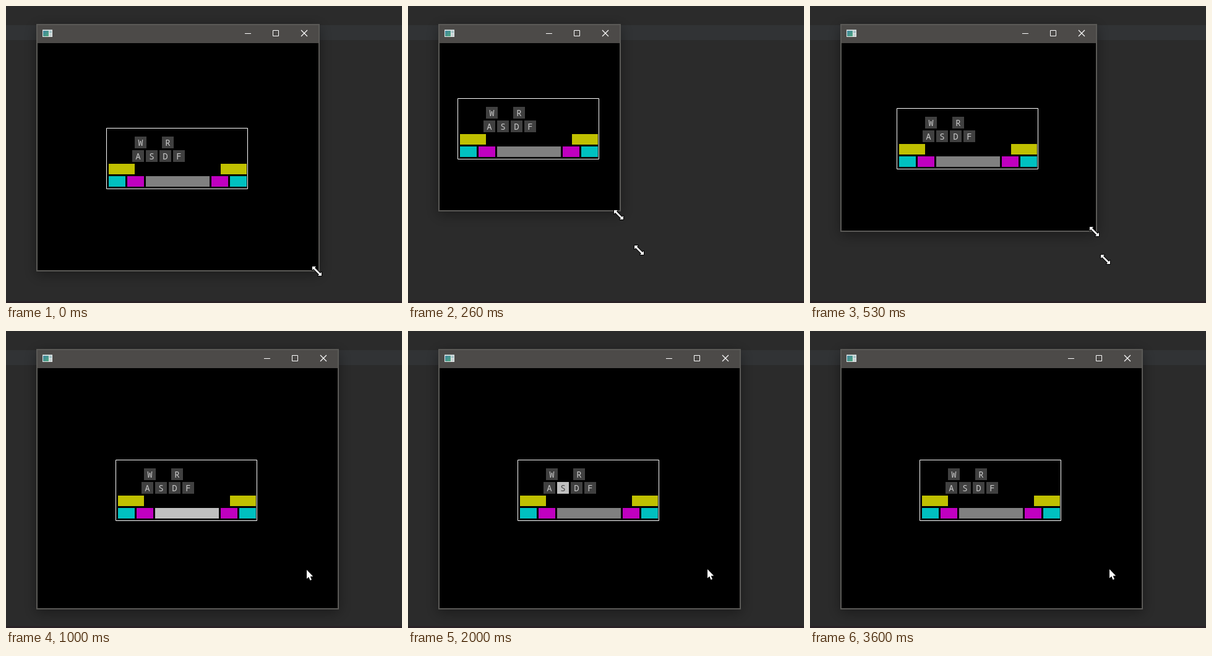
Animation, 640 px wide and 480 px high, one loop 3660 ms. Source, as an HTML page with a canvas:

```html
<!DOCTYPE html>
<html lang="en">
<head>
<meta charset="utf-8">
<title>Keyboard overlay</title>
<style>
html, body { margin: 0; width: 100%; height: 100%; overflow: hidden; background: #2b2b2b; }
canvas { display: block; width: 640px; height: 480px; }
</style>
</head>
<body>
<canvas id="stage" width="640" height="480"></canvas>
<script>
const ctx = document.getElementById('stage').getContext('2d');
const LOOP = 3660;

// start time, window right, window bottom, cursor x, cursor y
const sizes = [
  [0, 506, 428, 503, 429],
  [130, 447, 417, 445, 419],
  [200, 376, 389, 374, 395],
  [260, 343, 331, 341, 338],
  [330, 470, 378, 468, 381],
  [400, 590, 426, 587, 428],
  [460, 483, 407, 478, 410],
  [530, 463, 364, 460, 365],
  [600, 537, 449, 535, 450]
];

// start time, tip x, tip y
const pointer = [[660, 511, 417], [730, 486, 386], [1060, 485, 385], [1460, 484, 385]];

// key, pressed at, released at
const presses = [
  ['space', 1000, 1130], ['alt', 1200, 1330], ['ctrl', 1400, 1530], ['shift', 1600, 1660],
  ['S', 2000, 2130], ['A', 2200, 2260], ['D', 2400, 2460],
  ['F', 2800, 2930], ['R', 3000, 3130], ['F', 3200, 3260],
  ['W', 3530, 3600]
];

const letters = { W: [46, 14], R: [90, 14], A: [42, 36], S: [64, 36], D: [86, 36], F: [108, 36] };

// key, x, y, width, idle colour, pressed colour
const bars = [
  ['shift', 4, 58, 42, '#c0c000', '#ffff00'],
  ['shift', 185, 58, 42, '#c0c000', '#ffff00'],
  ['ctrl', 4, 78, 27, '#00c0c0', '#00ffff'],
  ['alt', 34, 78, 27, '#c000c0', '#ff00ff'],
  ['space', 64, 78, 103, '#808080', '#c0c0c0'],
  ['alt', 170, 78, 27, '#c000c0', '#ff00ff'],
  ['ctrl', 200, 78, 27, '#00c0c0', '#00ffff']
];

const resizeShape = [[-8, -8], [-2, -8], [-4, -6], [5, 3], [7, 1], [7, 7], [1, 7], [3, 5], [-6, -4], [-8, -2]];
const arrowShape = [[0, 0], [0, 14.5], [3.2, 11.6], [5.6, 17], [8, 16], [5.7, 10.7], [10.2, 10.5]];

function rect(x, y, w, h, color) {
  ctx.fillStyle = color;
  ctx.fillRect(x, y, w, h);
}

function current(steps, t) {
  let i = steps.length - 1;
  while (i > 0 && steps[i][0] > t) i--;
  return i;
}

function shape(points, x, y) {
  ctx.beginPath();
  points.forEach(([px, py]) => ctx.lineTo(x + px, y + py));
  ctx.closePath();
  ctx.lineWidth = 2;
  ctx.lineJoin = 'round';
  ctx.strokeStyle = '#000';
  ctx.stroke();
  ctx.fillStyle = '#fff';
  ctx.fill();
}

function drawIcon() {
  rect(59, 38, 16, 12, '#e4e8e8');
  rect(59, 38, 16, 1, '#a9b6b8');
  const g = ctx.createLinearGradient(60, 40, 69, 49);
  g.addColorStop(0, '#3f83a0');
  g.addColorStop(1, '#4fa77c');
  rect(60, 40, 9, 9, g);
  rect(70, 40, 4, 4, '#a9c4c8');
  rect(70, 45, 4, 4, '#c6d2d2');
}

function drawWindow(right, bottom) {
  ctx.save();
  ctx.shadowColor = 'rgba(0,0,0,0.38)';
  ctx.shadowBlur = 20;
  ctx.shadowOffsetY = 5;
  rect(49, 29, right - 48, bottom - 28, '#5a5956');
  ctx.restore();
  rect(51, 31, right - 52, 29, '#4c4a48');
  rect(51, 60, right - 52, bottom - 61, '#000');
  drawIcon();

  rect(right - 120, 44, 10, 1, '#fff');
  ctx.strokeStyle = '#fff';
  ctx.lineWidth = 1;
  ctx.strokeRect(right - 74.5, 39.5, 9, 9);
  const x = right - 29;
  ctx.lineWidth = 1.15;
  ctx.beginPath();
  ctx.moveTo(x, 39);
  ctx.lineTo(x + 10, 49);
  ctx.moveTo(x + 10, 39);
  ctx.lineTo(x, 49);
  ctx.stroke();
}

function drawKeyboard(x, y, isDown) {
  ctx.strokeStyle = '#fff';
  ctx.lineWidth = 1;
  ctx.strokeRect(x + 0.5, y + 0.5, 228, 98);
  for (const [key, kx, ky, w, idle, lit] of bars) {
    rect(x + kx, y + ky, w, 17, isDown(key) ? lit : idle);
  }
  ctx.font = '14px "Noto Sans Mono", monospace';
  ctx.textAlign = 'center';
  ctx.textBaseline = 'alphabetic';
  for (const [key, [kx, ky]] of Object.entries(letters)) {
    const down = isDown(key);
    rect(x + kx, y + ky, 19, 19, down ? '#c0c0c0' : '#404040');
    ctx.fillStyle = down ? '#484848' : '#c8c8c8';
    ctx.fillText(key, x + kx + 9.5, y + ky + 15);
  }
}

function drawCursor(t, i) {
  if (t >= pointer[0][0]) {
    const [, x, y] = pointer[current(pointer, t)];
    shape(arrowShape, x, y);
    return;
  }
  const [, right, bottom, x, y] = sizes[i];
  // A shrinking window leaves the previous cursor behind
  if (i > 0) {
    const [, , , px, py] = sizes[i - 1];
    if (px > right || py > bottom) shape(resizeShape, px, py);
  }
  shape(resizeShape, x, y);
}

function draw(t) {
  rect(0, 0, 640, 480, '#2b2b2b');
  rect(0, 31, 640, 24, '#313335');
  rect(0, 477, 640, 3, '#2a2226');
  const i = current(sizes, t);
  const [, right, bottom] = sizes[i];
  drawWindow(right, bottom);
  const isDown = key => presses.some(([k, from, to]) => k === key && t >= from && t < to);
  drawKeyboard(Math.floor(right / 2) - 91, Math.ceil(bottom / 2) - 17, isDown);
  drawCursor(t, i);
}

const start = performance.now();
function tick() {
  draw((performance.now() - start) % LOOP);
  requestAnimationFrame(tick);
}
tick();
</script>
</body>
</html>
```
